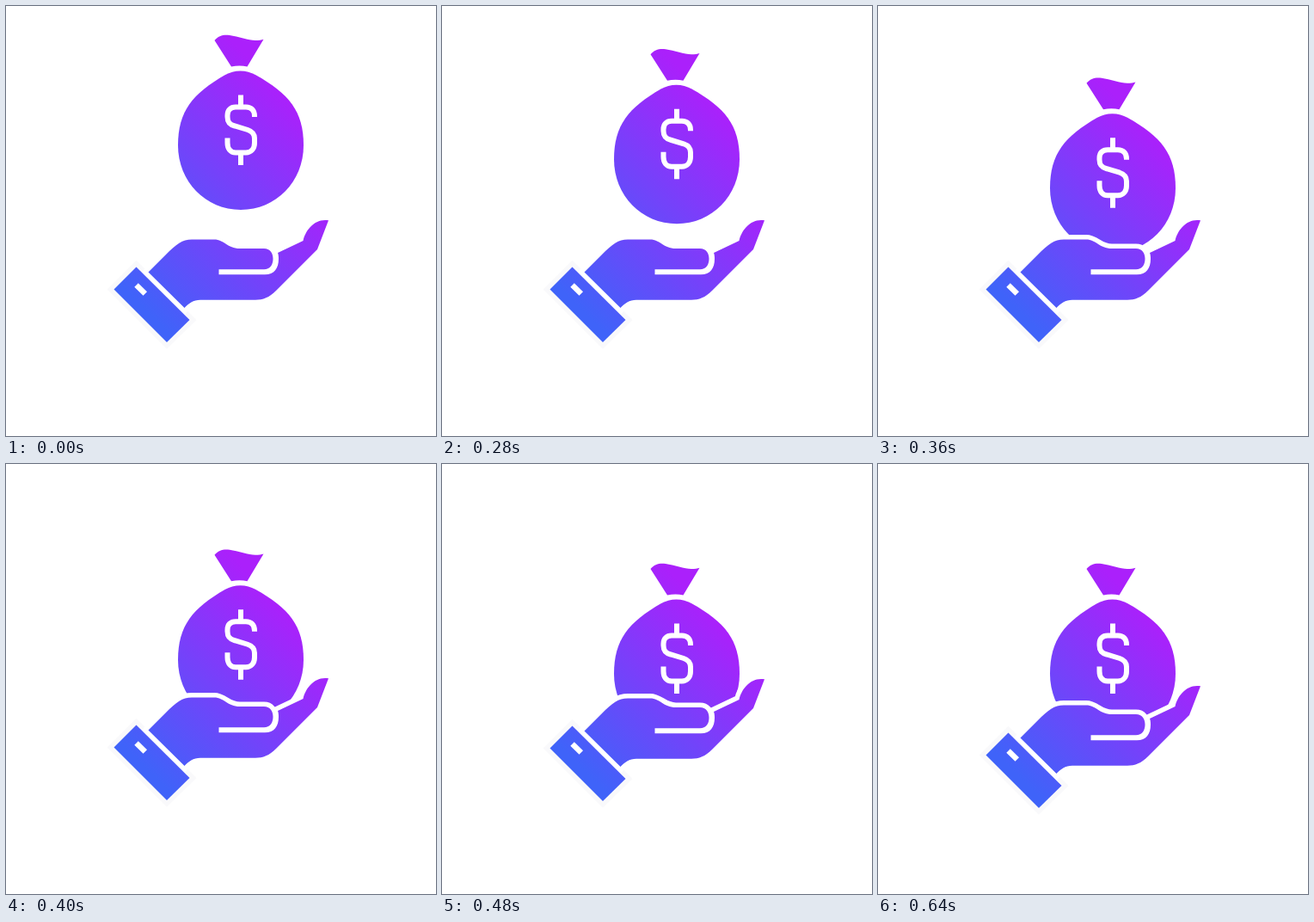
These frames come from a looping animation (500 by 500 pixels, 2.92 s). An HTML page with a canvas:

```html
<!DOCTYPE html>
<html lang="en">
<head>
<meta charset="utf-8">
<title>Money bag in hand</title>
<style>
html, body { margin: 0; width: 100%; height: 100%; overflow: hidden; background: #fff; }
canvas { display: block; width: 500px; height: 500px; }
</style>
</head>
<body>
<canvas id="stage" width="500" height="500"></canvas>
<script>
const ctx = document.getElementById('stage').getContext('2d');
const LOOP = 2920, STEP = 40;
const BAG_DROP = 82, HAND_DROP = 9;

const knot = new Path2D(`M242.5 40 C247 34.5 253 33 260 34 C270 35.5 282 40 290 40
  C294 40 297 39.5 299.5 38.7 L280.5 70.5 C275 69.3 268 69.3 262 70.5 Z`);
const sack = new Path2D(`M272.5 75.5 C279 75.5 285 77.3 290 80 C329 102 346 122 346 162
  C346 204 314 237 273 237 C232 237 200 204 200 162
  C200 122 217 102 255 80 C260 77.3 266 75.5 272.5 75.5 Z`);
const dollar = new Path2D(`M289 129 V128 C289 121 285 117.5 279 117.5 H267
  C261 117.5 257.5 121 257.5 127 V129 C257.5 135 260 138 266 139.5 L281 144
  C287 146 289 149 289 154 V159 C289 166 285 170.5 279 170.5 H267
  C261 170.5 257.5 166 257.5 159 V153.5 M273 103.5 V117 M273 171 V185`);
const hand = new Path2D(`M165.5 309.5 L186 289 C198 277 205 271.5 216 271.5 H242
  C254 271.5 257 282 272 282 H300 C307 282 310.5 287 310.5 294
  C310.5 301 307 306.3 300 306.3 H247.5 V312.3 H301 C312 312.3 317 305 317 294
  C317 291 316.8 289 316 287 L345.5 273 C348 261 359 246.5 375 249.3
  L362 283 L314 331 C306 339 299 341.7 290 341.7 H226 C218 341.7 212 346 207.5 351 Z`);
const cuff = new Path2D('M151.5 303.5 L213.5 365 L187 391 L125.5 329.5 Z');
const button = new Path2D('M149.3 326.8 L153.8 322.3 L164 332.2 L159.5 336.7 Z');

// The gradient fits the resting pose; each part carries its share along.
function blend(drop) {
  const g = ctx.createLinearGradient(125, 325 - drop, 295, 155 - drop);
  g.addColorStop(0, '#3f63f9');
  g.addColorStop(1, '#ab20fb');
  return g;
}

function outline(path, color, width) {
  ctx.strokeStyle = color;
  ctx.lineWidth = width;
  ctx.stroke(path);
}

function fill(path, color) {
  ctx.fillStyle = color;
  ctx.fill(path);
}

function ease(t, start, end) {
  const u = Math.min(1, Math.max(0, (t - start) / (end - start)));
  return u * u * (3 - 2 * u);
}

function at(y, paint) {
  ctx.save();
  ctx.translate(0, y);
  paint();
  ctx.restore();
}

function drawBag() {
  const color = blend(BAG_DROP);
  fill(knot, color);
  fill(sack, color);
  outline(dollar, '#fff', 6);
}

function drawHand() {
  const color = blend(HAND_DROP);
  outline(cuff, '#f9f9fb', 11);
  outline(hand, '#fff', 11);
  fill(hand, color);
  fill(cuff, color);
  fill(button, '#fff');
}

function draw(t) {
  ctx.fillStyle = '#fff';
  ctx.fillRect(0, 0, 500, 500);
  at(BAG_DROP * ease(t, 200, 480), drawBag);
  at(HAND_DROP * ease(t, 440, 640), drawHand);
}

const start = performance.now();
function tick() {
  const t = (performance.now() - start) % LOOP;
  draw(Math.floor(t / STEP) * STEP);
  requestAnimationFrame(tick);
}
tick();
</script>
</body>
</html>
```
